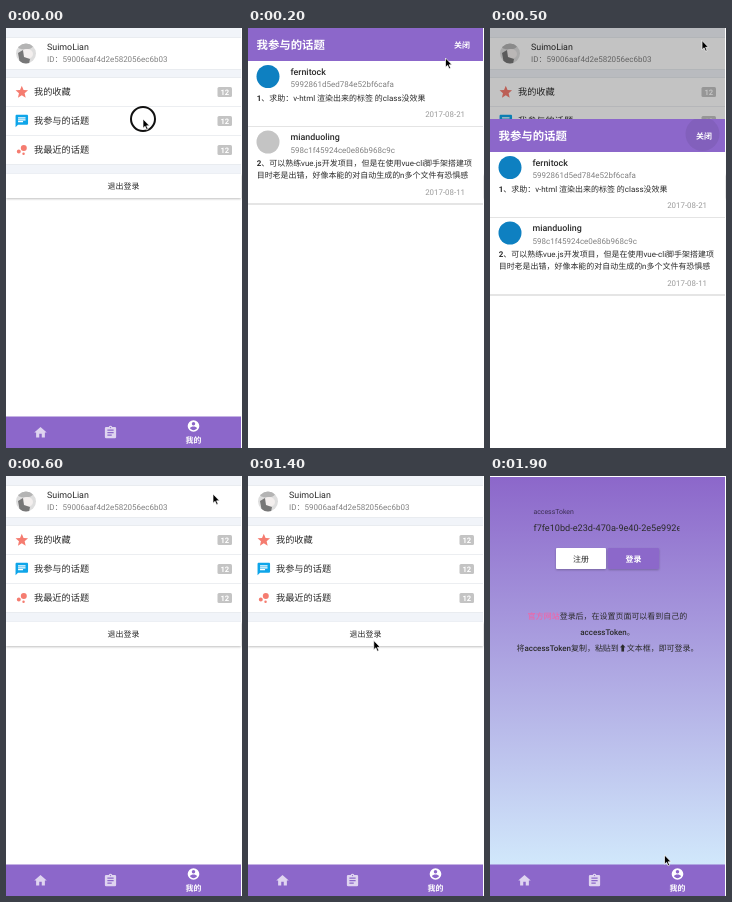
An HTML page for the animation above (2 s loop, 236x420 px).

```html
<!DOCTYPE html>
<html lang="zh-CN">
<head>
<meta charset="utf-8">
<title>个人中心</title>
<style>
  html, body { margin: 0; width: 100%; height: 100%; overflow: hidden; background: #fff; }
  svg { display: block; width: 236px; height: 420px; }
  text {
    font: 7.97px Roboto, "Noto Sans CJK SC", "Noto Sans CJK", "DejaVu Sans", sans-serif;
    fill: #2b2b2b; text-rendering: geometricPrecision; white-space: pre;
  }
  .mid { text-anchor: middle; }
  .end { text-anchor: end; }
  .bold { font-weight: 700; }
  .light { fill: #fff; }
  .name { font-size: 8.9px; }
  .id { font-size: 8px; fill: #808080; }
  .row { font-size: 9.2px; }
  .badge { font-size: 7.6px; font-weight: 700; }
  .date { font-size: 7.9px; fill: #9a9a9a; }
  .title { font-size: 11.4px; font-weight: 700; }
  .strong { font-weight: 500; }
</style>
</head>
<body>
<svg viewBox="0 0 236 420">
  <defs>
    <linearGradient id="sky" x2="0" y2="1">
      <stop stop-color="#8c67ca"/><stop offset="1" stop-color="#d1e8fb"/>
    </linearGradient>
    <filter id="shadow" x="-20%" y="-30%" width="140%" height="180%">
      <feDropShadow dx="0" dy="1" stdDeviation="1" flood-opacity=".25"/>
    </filter>
    <clipPath id="field"><rect x="43" y="44" width="146.5" height="16"/></clipPath>
    <clipPath id="header"><rect width="235" height="33"/></clipPath>
    <clipPath id="face"><circle cx="20" cy="25.5" r="10"/></clipPath>
  </defs>

  <g id="profile">
    <rect width="235" height="146" fill="#f1f4f9"/>
    <path d="M0 10H235V41H0ZM0 50H235V136H0Z" fill="#fff"/>
    <path d="M0 9.5H235M0 41.5H235M0 49.5H235M0 78.5H235M0 107.5H235M0 136.5H235" stroke="#e8eaee" stroke-width=".8"/>
    <g clip-path="url(#face)">
      <rect x="10" y="15" width="20" height="21" fill="#dedede"/>
      <ellipse cx="19" cy="18" rx="8" ry="3.5" fill="#b4b4b4"/>
      <ellipse cx="21" cy="26" rx="6" ry="5" fill="#f3efee"/>
      <path d="M12 25L17 22L18 29L24 31L23 36H14Z" fill="#777"/>
    </g>
    <text class="name" x="41" y="22">SuimoLian</text>
    <text class="id" x="41" y="33.5">ID：59006aaf4d2e582056ec6b03</text>
    <g id="rows"></g>
    <rect y="146" width="235" height="24" fill="#fff" filter="url(#shadow)"/>
    <text class="mid" x="117.5" y="161">退出登录</text>
  </g>

  <g id="login">
    <rect y="1" width="235" height="388" fill="url(#sky)"/>
    <text x="43.5" y="37.5" style="font-size:6.9px;fill:#0009">accessToken</text>
    <text x="43.5" y="55" clip-path="url(#field)" style="font-size:9.15px">f7fe10bd-e23d-470a-9e40-2e5e992e</text>
    <g filter="url(#shadow)">
      <rect x="66" y="72" width="50" height="21" rx="1" fill="#fff"/>
      <rect x="118" y="72" width="51" height="21" rx="1" fill="#8c67ca"/>
    </g>
    <text class="mid strong" x="91" y="85.5">注册</text>
    <text class="mid bold light" x="143.5" y="85.5">登录</text>
    <text class="mid" x="117.5" y="143"><tspan fill="#ff5c9d">官方网站</tspan>登录后，在设置页面可以看到自己的</text>
    <text class="mid strong" x="117.5" y="159">accessToken。</text>
    <text class="mid" x="117.5" y="175">将<tspan class="strong">accessToken</tspan>复制，粘贴到⬆文本框，即可登录。</text>
  </g>

  <g id="tabs">
    <rect y="388.5" width="235" height="31.5" fill="#8c67ca"/>
    <text class="mid bold light" x="187.5" y="415">我的</text>
  </g>

  <rect id="shade" width="235" height="420"/>

  <g id="dialog">
    <rect width="235" height="420" fill="#fff"/>
    <rect width="235" height="33" fill="#8c67ca"/>
    <circle id="ripple" cx="212.5" cy="15" r="17" fill="#000" opacity=".07" clip-path="url(#header)"/>
    <text class="title light" x="8.5" y="21">我参与的话题</text>
    <text class="bold light" x="206" y="20">关闭</text>
    <g id="topics"></g>
    <path d="M0 98.5H235" stroke="#e4e4e4"/>
    <path d="M0 176H235" stroke="#dcdcdc" stroke-width="1.5"/>
  </g>

  <circle id="ring" r="12" fill="none" stroke="#111" stroke-width="2"/>
  <path id="cursor" d="M0 0V9.2L2.1 7.3L3.6 10.8L5.1 10.1L3.6 6.8H6.5Z" fill="#000" stroke="#fff" stroke-width=".7"/>
</svg>
<script>
const $ = id => document.getElementById(id);
const add = (id, markup) => $(id).insertAdjacentHTML('beforeend', markup);

const icons = {
  star: 'M12 17.27L18.18 21l-1.64-7.03L22 9.24l-7.19-.61L12 2 9.19 8.63 2 9.24l5.46 4.73L5.82 21z',
  chat: 'M20 2H4c-1.1 0-2 .9-2 2v18l4-4h14c1.1 0 2-.9 2-2V4c0-1.1-.9-2-2-2zM6 9h12v2H6zm8 5H6v-2h8zm4-6H6V6h12z',
  bubbles: 'M4 14.4a3.2 3.2 0 1 0 6.4 0a3.2 3.2 0 1 0-6.4 0zM12.8 18a2 2 0 1 0 4 0a2 2 0 1 0-4 0zM10.4 8.8a4.8 4.8 0 1 0 9.6 0a4.8 4.8 0 1 0-9.6 0z',
  home: 'M10 20v-6h4v6h5v-8h3L12 3 2 12h3v8z',
  clipboard: 'M19 3h-4.2a3 3 0 0 0-5.6 0H5a2 2 0 0 0-2 2v14a2 2 0 0 0 2 2h14a2 2 0 0 0 2-2V5a2 2 0 0 0-2-2zM12 3a1 1 0 0 1 0 2a1 1 0 0 1 0-2zM14 17H7v-2h7zM17 13H7v-2h10zM17 9H7V7h10z',
  account: 'M12 2a10 10 0 0 0 0 20a10 10 0 0 0 0-20zm0 3a3 3 0 0 1 0 6a3 3 0 0 1 0-6zm0 14.2c-2.5 0-4.7-1.3-6-3.2c0-2 4-3.1 6-3.1s6 1.1 6 3.1c-1.3 1.9-3.5 3.2-6 3.2z'
};
const icon = (name, x, y, fill, size = 15) =>
  `<path d="${icons[name]}" fill="${fill}" fill-rule="evenodd" transform="translate(${x} ${y}) scale(${size / 24}) translate(-12 -12)"/>`;

[['star', '#f57c70', '我的收藏'], ['chat', '#0ea5e9', '我参与的话题'], ['bubbles', '#f57c70', '我最近的话题']]
  .forEach(([name, color, label], i) => {
    const y = 64 + 29 * i;
    add('rows', icon(name, 15.8, y, color) +
      `<text class="row" x="28" y="${y + 3.3}">${label}</text>
       <rect x="211.5" y="${y - 5}" width="14.5" height="10" rx="1.5" fill="#c4c4c4"/>
       <text class="badge mid light" x="218.8" y="${y + 2.8}">12</text>`);
  });

add('tabs', icon('home', 34.5, 404.5, '#ffffffb8') + icon('clipboard', 104.5, 404.5, '#ffffffb8') +
  icon('account', 187.5, 398, '#fff', 14));

const topic = (top, avatar, name, id, lines, date) => add('topics',
  `<circle id="${avatar}" cx="20" cy="${top + 15.5}" r="11.5" fill="#0e80c1"/>
   <text class="name strong" x="42.5" y="${top + 13.5}">${name}</text>
   <text class="id" x="42.5" y="${top + 26}">${id}</text>` +
  lines.map((line, i) => `<text x="8.7" y="${top + 39.5 + 12 * i}">${line}</text>`).join('') +
  `<text class="date end" x="217" y="${top + 44 + 12 * lines.length}">${date}</text>`);

topic(33, 'avatarA', 'fernitock', '5992861d5ed784e52bf6cafa',
  ['<tspan class="bold">1</tspan>、求助：v-html 渲染出来的标签 的class没效果'], '2017-08-21');
topic(98.5, 'avatarB', 'mianduoling', '598c1f45924ce0e86b968c9c',
  ['<tspan class="bold">2</tspan>、可以熟练vue.js开发项目，但是在使用vue-cli脚手架搭建项',
   '目时老是出错，好像本能的对自动生成的n多个文件有恐惧感'], '2017-08-11');

// time, x, y
const route = [
  [0, 137, 91], [200, 197.5, 30], [300, 211, 13], [500, 212, 12.5], [600, 207, 18], [900, 165, 400],
  [1000, 142.5, 344], [1300, 125.5, 164], [1500, 126, 165], [1800, 183, 362], [1900, 174.5, 379], [2000, 174.5, 379]
];
function pointerAt(t) {
  const i = route.findIndex(stop => stop[0] > t);
  const [t0, x0, y0] = route[i - 1], [t1, x1, y1] = route[i];
  const p = (t - t0) / (t1 - t0);
  return `translate(${x0 + (x1 - x0) * p} ${y0 + (y1 - y0) * p})`;
}

const show = (id, on) => $(id).setAttribute('display', on ? 'inline' : 'none');

function draw(now) {
  const t = Math.floor(now % 2000 / 100) * 100;   // the picture steps every 100 ms
  const open = t > 0 && t < 600;
  // 1 = dialog below the stage, 0 = fully raised
  const away = Math.max(0, 1 - t / 200, (t - 400) / 200) ** 2.2;

  show('login', t >= 1500);
  show('profile', t < 1500);
  show('dialog', open);
  show('shade', open);
  $('shade').setAttribute('opacity', .3 * (1 - away));
  $('dialog').setAttribute('transform', `translate(0 ${Math.round(420 * away)})`);
  show('ripple', t >= 500);
  $('avatarB').setAttribute('fill', t < 300 ? '#c4c4c4' : '#0e80c1');

  const pointer = pointerAt(t);
  $('cursor').setAttribute('transform', pointer);
  $('ring').setAttribute('transform', pointer);
  show('ring', t === 0 || t === 400);
  requestAnimationFrame(() => draw(performance.now() - start));
}
const start = performance.now();
draw(0);
</script>
</body>
</html>
```
